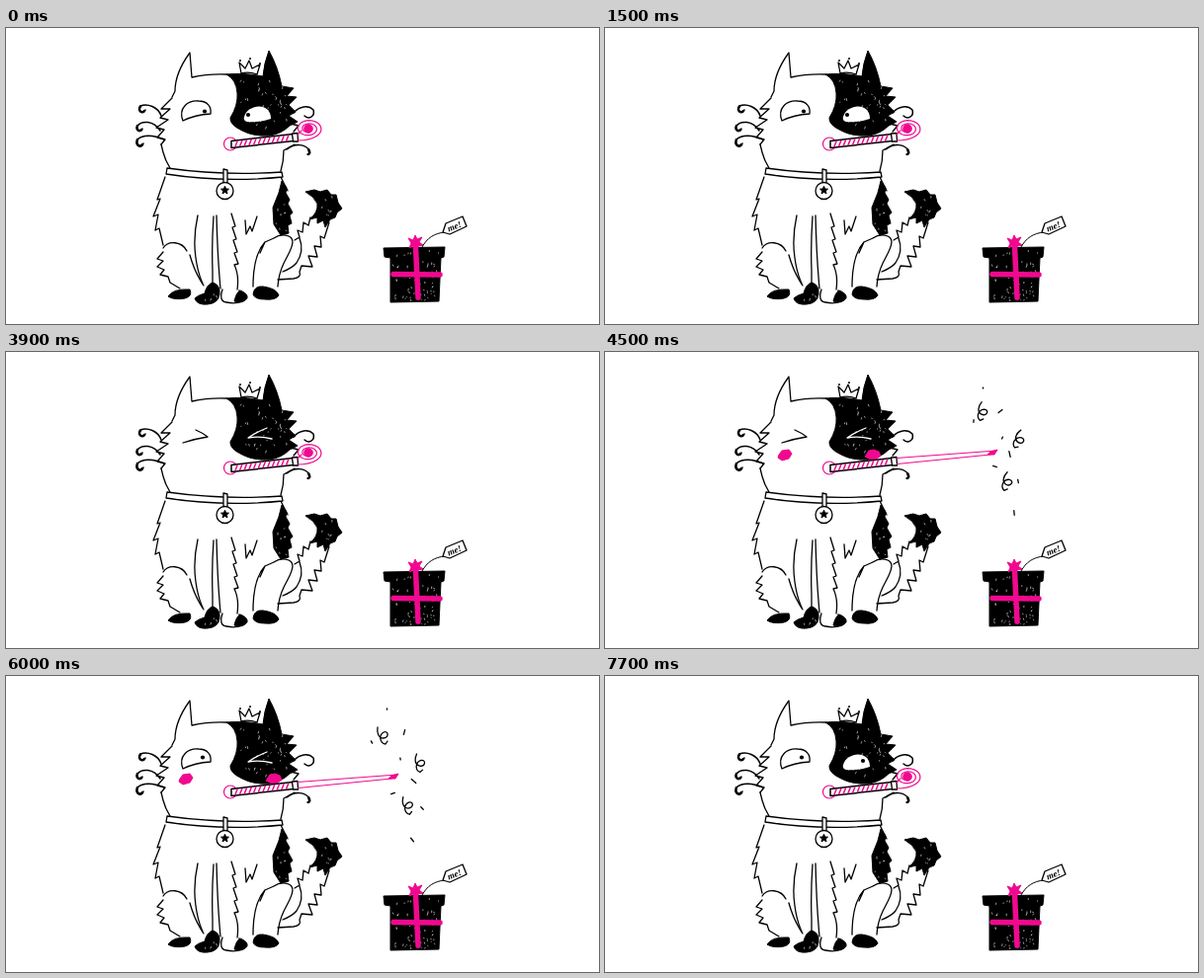
Write an HTML page that moves like this. It is 600 px wide and 300 px high and loops after 8 s.

```html
<!DOCTYPE html>
<html lang="en">
<head>
<meta charset="utf-8">
<title>Party cat</title>
<style>
html, body { margin: 0; width: 100%; height: 100%; overflow: hidden; background: #fff; }
svg { display: block; width: 100vw; height: 100vh; }
.ln { fill: none; stroke: #000; stroke-width: 1.3; stroke-linecap: round; stroke-linejoin: round; }
.wh { fill: #fff; }
.bk { fill: #000; stroke: #000; stroke-width: 1; stroke-linejoin: round; }
.pk { fill: none; stroke: #f0098f; stroke-width: 1.2; stroke-linecap: round; stroke-linejoin: round; }
.pf { fill: #f0098f; stroke: #f0098f; stroke-width: 1; stroke-linejoin: round; }
.sp { fill: none; stroke: #fff; stroke-width: .6; stroke-linecap: round; }
</style>
</head>
<body>
<svg viewBox="0 0 600 300" preserveAspectRatio="none">
  <!-- tail -->
  <path class="ln" d="M308 192 L306 200 L301 197 L300 207 L295 205 L297 212 L292 215 M327 197 L322 213 L318 211 L319 222 L312 221 L315 232 L306 231 L310 242 L299 241 L297 247 Q299 253 291 254 L275 255 M297 213 Q302 226 294 238 Q290 243 280 247"/>
  <path class="bk" d="M303 166 L312 164 L318 166 L325 164 L329 169 L334 169 L336 177 L340 183 L335 187 L333 192 L328 194 L323 202 L321 195 L315 198 L315 192 L307 194 Q316 187 315 178 Q312 171 303 166Z"/>
  <!-- body -->
  <path class="ln" d="M161 151 L153 174 L156 173 L149 191 L154 189 L151 205 L155 203 L159 220"/>
  <path class="ln" d="M159 223 C164 215 178 216 183 226 M186 230 Q191 248 200 261 M159 227 L153 234 L159 236 L153 242 L160 245 L156 250 L164 252 L166 258 L176 264"/>
  <path class="ln" d="M194 190 Q189 213 192 233 Q194 248 199 259 M210 191 Q208 220 209 246 L209 259 M213 190 Q214 232 217 264"/>
  <path class="ln" d="M228 188 L232 201 L229 202 L233 214 L230 215 L234 227 L231 228 L235 239 L231 240 Q236 250 234 265"/>
  <path class="ln" d="M242 195 L243 209 L247 201 L249 206 L254 191"/>
  <path class="ln" d="M271 213 C278 208 290 209 290 217 C289 230 277 236 275 262 M262 217 Q250 230 250 262 M257 228 L262 217 L271 213"/>
  <path class="bk" d="M279 155 L284 162 L283 167 L287 174 L285 178 L290 187 L287 190 L289 198 L285 200 L286 208 L278 210 L271 199 L270 182 L276 167Z"/>
  <path class="ln" d="M278 151 L285 165"/>
  <path class="bk" d="M164 272 Q169 264 186 265 Q189 272 181 274 Q170 276 164 272Z"/>
  <path class="bk" d="M191 274 Q194 271 201 269 Q203 260 209 258 Q217 260 216 270 Q215 279 204 280 Q193 281 191 274Z"/>
  <path class="ln wh" d="M219 265 Q215 277 223 278 Q232 280 239 277 L236 266"/>
  <path class="bk" d="M237 266 Q245 269 244 274 Q239 280 231 277 Q233 268 237 266Z"/>
  <path class="bk" d="M250 270 Q251 261 260 262 Q274 264 276 271 Q273 276 262 275 Q252 275 250 270Z"/>
  <path class="sp" id="specksBody"/>

  <path class="ln" id="neck"/>
  <path class="ln wh" d="M163 142 Q220 150 279 146 L280 151 Q220 157 162 148Z"/>
  <path class="ln wh" d="M220 143 L224 144 L224 158 L220 157Z"/>
  <circle class="ln wh" cx="221.5" cy="165" r="8.5"/>
  <path class="bk" id="star"/>

  <g id="head">
    <path class="ln" d="M168 70 L171 64 C171 50 178 36 186 25 L188 50 Q205 46 224 47"/>
    <path class="ln" d="M168 71 L157 82 L166 82 L156 91 L164 93 L152 101 L160 103 L153 111 L161 113 L157 118"/>
    <path class="bk" d="M223 47 Q240 45 260 49 Q261 36 266 23 Q275 39 279 59 L291 61 L284 69 L294 70 L286 78 L293 85 L286 89 L295 95 L287 99 Q279 107 267 109 Q250 110 239 104 Q226 98 227 91 Q235 78 234 66 Q233 52 223 47Z"/>
    <path class="sp" id="specksHead"/>
    <path class="ln" d="M288 97 L296 99 L291 105"/>
    <path class="ln" d="M238 46 L236 35 L242 41 L246 33 L249 41 L257 37 L254 47 Q246 44 238 46"/>
    <circle cx="237" cy="33" r="1"/><circle cx="247" cy="31" r="1"/><circle cx="257" cy="36" r="1"/>
    <!-- whiskers -->
    <g class="ln" style="stroke-width:1.5">
      <path d="M157 89 C154 80 143 76 136 79 C132 84 139 88 141 83"/>
      <path d="M156 104 C149 93 137 94 133 99 C130 105 138 106 138 102"/>
      <path d="M160 113 C149 108 138 108 133 113 C129 120 138 123 139 117"/>
      <path d="M291 86 C297 79 306 78 311 83 C313 90 306 93 302 89"/>
      <path d="M284 123 C293 116 303 118 307 124 Q309 128 305 128"/>
    </g>
    <g class="ln" style="stroke-width:2.4">
      <path d="M136 79.500 C133 84 138 87 140 84 M133 99 C131 104 136 105 137 103 M133 113 C131 119 136 121 138 118 M306 123 Q308 127 306 128"/>
    </g>
    <!-- eyes -->
    <g id="openL">
      <path class="ln wh" d="M179 94 C174 81 184 73 195 74 C204 74 208 80 207 87 Q191 88 179 94Z"/>
      <circle id="pupilL" r="2.1"/>
    </g>
    <g id="openR">
      <path class="wh" d="M241 90 C243 82 253 78 260 80 C266 82 268 87 268 92 Q256 96 244 95 Q240 94 241 90Z"/>
      <circle id="pupilR" r="2.1"/>
    </g>
    <path class="ln" id="shutL" d="M192 79 Q199 82 204 86 Q191 88 179 92"/>
    <path class="ln" id="shutR" style="stroke:#fff" d="M264 77 Q254 81 245 87 Q257 85 269 88"/>
    <g id="cheeks" class="pf">
      <path d="M176 104 L179 100 L186 99 L189 103 L186 108 L179 110 L175 107Z"/>
      <path d="M263 106 L267 100 L272 99 L277 101 L279 105 L274 109 L267 108Z"/>
    </g>
    <!-- party blower -->
    <circle class="pk" cx="227" cy="117.500" r="6.500"/>
    <path class="ln wh" style="stroke-width:1.5" d="M228 114.500 L290 107.500 L291 114.500 L228 121.500Z"/>
    <path class="pk" id="stripes" style="stroke-width:1.500"/>
    <path class="ln wh" d="M289.500 107 L295 106.500 L295.500 115 L290.500 115Z"/>
    <path class="pk" id="paper"/>
    <g id="roll"><path class="pk" id="spiral"/><circle class="pf" r="4.300"/></g>
    <path class="pf" id="tip" d="M387 104 L390 101 L397 99 L394 104Z"/>
  </g>

  <g id="confetti" class="ln"></g>

  <!-- present -->
  <path class="bk" d="M382 223 L444 222 L443 232 L440 233 L438 277 L389 278 L389 233 L383 232Z"/>
  <path class="sp" id="specksBox"/>
  <path class="pk" style="stroke-width:5.500" d="M414.500 222 L417 273"/>
  <path class="pk" style="stroke-width:5.500" d="M392 249.500 L439 250"/>
  <path class="pf" d="M407 213 L412 215 L414 210 L416 214 L421 212 L418 217 L422 220 L417 221 L416 225 L412 221 L408 223 L410 218Z"/>
  <path class="ln" style="stroke-width:1" d="M421 222 C426 213 433 208 444 207"/>
  <path class="ln wh" d="M442 207 L445 198 L462 191 L466 201 L449 209Z"/>
  <text x="448" y="206.500" transform="rotate(-22 448 206.500)" font-family="'Liberation Serif', serif" font-style="italic" font-weight="bold" font-size="9">me!</text>
</svg>
<script>
const LOOP = 8000;
const el = id => document.getElementById(id);
const setD = (id, d) => el(id).setAttribute("d", d);
const show = (id, on) => el(id).setAttribute("display", on ? "inline" : "none");
const within = (t, a, b) => t >= a && t < b;

let seed = 11;
const rnd = () => (seed = seed * 16807 % 2147483647) / 2147483647;

// Little unfilled gaps in the ink
function specks(x, y, w, h, n) {
  let d = "";
  for (let i = 0; i < n; i++) {
    const px = x + rnd() * w, py = y + rnd() * h;
    d += `M${px.toFixed(1)} ${py.toFixed(1)}l${(rnd() * 1.6 - .8).toFixed(1)} ${(rnd() * 2).toFixed(1)}`;
  }
  return d;
}

function spiral(rx, ry, turns) {
  let d = "";
  const n = 60;
  for (let i = 0; i <= n; i++) {
    const k = i / n, a = .9 - k * turns * 2 * Math.PI, s = 1 - k * .6;
    d += (i ? "L" : "M") + (rx * s * Math.cos(a)).toFixed(1) + " " + (ry * s * Math.sin(a)).toFixed(1);
  }
  return d;
}

function starPath(cx, cy, r) {
  let d = "";
  for (let i = 0; i < 10; i++) {
    const a = -Math.PI / 2 + i * Math.PI / 5, q = i % 2 ? r * .45 : r;
    d += (i ? "L" : "M") + (cx + q * Math.cos(a)).toFixed(1) + " " + (cy + q * Math.sin(a)).toFixed(1);
  }
  return d + "Z";
}

setD("star", starPath(221.5, 164.5, 4.2));
setD("specksHead", specks(238, 52, 46, 52, 40));
setD("specksBody", specks(273, 170, 12, 36, 8) + specks(318, 170, 14, 20, 8) + specks(195, 266, 18, 10, 5));
setD("specksBox", specks(391, 236, 45, 40, 60) + specks(386, 225, 54, 6, 8));
setD("spiral", spiral(13.5, 9.5, 1.8));

let stripes = "";
for (let x = 233; x < 288; x += 4.7) {
  const y = 114.5 - (x - 228) * .112;
  stripes += `M${x + 1} ${y + 1}L${x - 1} ${y + 6}`;
}
setD("stripes", stripes);

// Confetti: x, y, angle, length
const dashes = [
  [385.5, 33.5, 80, 1], [370, 67, 60, 2.5], [403, 57, 105, 5], [399, 84, 80, 2],
  [412.5, 106.5, 42, 6], [391.5, 119, -20, 4], [421, 134, 45, 3.5], [411, 166, 50, 4.5]
];
const curls = [[381, 61, 0], [418, 89, 15], [406, 132, 5]];
const curl = "M-5 -9 C-6 -3 -4 2 1 2 C7 1 6 -6 1 -4 C-4 -1 -3 7 3 8 L5 5";

function confetti(flip) {
  const bits = dashes.map(([x, y, a, n], i) => {
    const dx = flip ? (i % 2 ? 3 : -3) : 0, dy = flip ? (i < 4 ? 3 : -3) : 0;
    return `<path transform="translate(${x + dx} ${y + dy}) rotate(${a + (flip ? 35 : 0)})" d="M${-n / 2} 0H${n / 2}"/>`;
  });
  const swirls = curls.map(([x, y, a]) =>
    `<path transform="translate(${x} ${y}) rotate(${a + (flip ? 30 : 0)})" d="${curl}"/>`);
  el("confetti").innerHTML = bits.join("") + swirls.join("");
}

let last = "";
function draw(t) {
  const tilt = within(t, 500, 1500);
  const blink = within(t, 1800, 1900) || within(t, 7600, 7700);
  const squeeze = within(t, 3900, 5400);
  const wink = within(t, 5400, 6600);
  const half = within(t, 4200, 4500);
  const blow = within(t, 4500, 6600);
  const ahead = t >= 5400;
  const beat = Math.floor((t - 4500) / 300);
  const key = [tilt, blink, squeeze, wink, half, blow, ahead, blow && beat].join();
  if (key === last) return;
  last = key;

  el("head").setAttribute("transform", tilt ? "translate(-4 -1) rotate(-6.7 227 118)" : "");
  setD("neck", tilt
    ? "M152 125 L156 125 Q158 137 164 147 M288 110 L278 116 Q278 132 277 145"
    : "M157 118 L159 126 Q161 134 166 142 M292 118 L281 124 Q281 135 278 145");

  const shut = blink || squeeze;
  show("openL", !shut);
  show("shutL", shut);
  show("openR", !shut && !wink);
  show("shutR", shut || wink);
  const at = (id, x, y) => { el(id).setAttribute("cx", x); el(id).setAttribute("cy", y); };
  at("pupilL", ahead ? 199 : 201, ahead ? 82.5 : 84.5);
  at("pupilR", ahead ? 261 : 245, ahead ? 86 : 88);

  show("cheeks", blow);
  show("tip", blow);
  show("roll", !blow);
  el("roll").setAttribute("transform", half ? "translate(344 102) scale(.72)" : "translate(306 102)");
  setD("paper", blow ? "M295 107.500 L396 100 M295.500 113.500 L390 104"
    : half ? "M295 107.500 L338 104 M295.500 113.500 L348 108.500"
    : "M295 108 L299 104 M295.500 114 Q307 114 314.500 109.500");

  show("confetti", blow);
  if (blow) confetti(beat % 2 === 0);
}

const start = performance.now();
function tick() {
  draw((performance.now() - start) % LOOP);
  requestAnimationFrame(tick);
}
tick();
</script>
</body>
</html>
```
